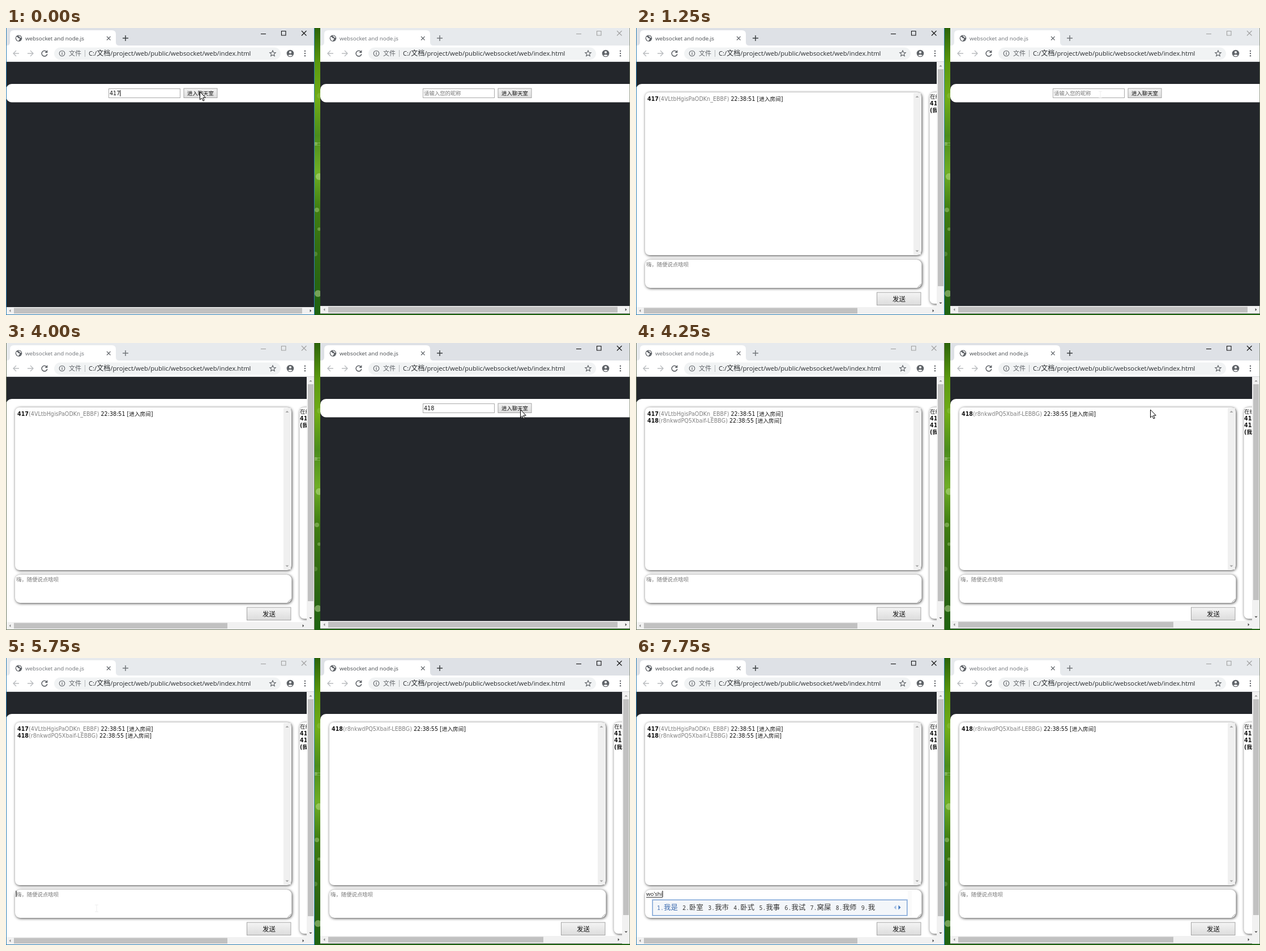
An HTML page that plays this animation: 1102 px wide and 508 px high, repeating every 8 s.

```html
<!DOCTYPE html>
<html lang="zh">
<head>
<meta charset="utf-8">
<title>websocket and node.js</title>
<style>
html, body { margin: 0; width: 100%; height: 100%; overflow: hidden; background: #23262b; }
svg { display: block; width: 1102px; height: 508px; }
text { white-space: pre; }
.ui { font-family: "Open Sans", "Noto Sans CJK SC", "Noto Sans CJK", sans-serif; }
.page { font: 9.6px "DejaVu Sans", "Noto Sans CJK SC", "Noto Sans CJK", sans-serif; fill: #111; }
.cand { font: 12.4px "Noto Sans CJK SC", "Noto Sans CJK", sans-serif; fill: #333; }
.num { font: 10px "Noto Sans Mono", monospace; }
.hint { fill: #777; font-size: 9.4px; }
.id { fill: #808080; }
.b { font-weight: bold; }
.win { --bar: #e7eaed; --ink: #a0a0a0; --title: #6c7075; --plus: #72767a; --edge: #6f7a62; }
.win.on { --bar: #dee1e6; --ink: #111; --title: #45494d; --plus: #3c4043; }
.win.edge { --edge: #2c7fb5; }
.line { fill: none; stroke-width: 1.1; }
.card { fill: #fff; filter: drop-shadow(1px 1px 2.5px rgba(0,0,0,.75)); }
</style>
</head>
<body>
<svg id="stage" viewBox="0 0 1102 508" xmlns="http://www.w3.org/2000/svg"></svg>
<script>
const LOOP = 8000, STEP = 250;
const users = [
  { name: '417', id: '4VLtbHgisPaODKn_EBBF', time: '22:38:51' },
  { name: '418', id: 'r8nkwdPQ5Xbaif-LEBBG', time: '22:38:55' }
];

const rect = (x, y, w, h, fill, more = '') =>
  `<rect x="${x}" y="${y}" width="${w}" height="${h}" fill="${fill}" ${more}/>`;
const text = (x, y, s, more = 'class="page"') => `<text x="${x}" y="${y}" ${more}>${s}</text>`;
const path = (d, stroke, more = '') => `<path class="line" d="${d}" stroke="${stroke}" ${more}/>`;
const dot = (x, y, r, fill, more = '') => `<circle cx="${x}" cy="${y}" r="${r}" fill="${fill}" ${more}/>`;

// small triangle pointing by angle: 0 right, 90 down
const tri = (x, y, angle, fill, s = 3) =>
  `<path d="M${-s / 2} ${-s}L${s / 2} 0L${-s / 2} ${s}Z" fill="${fill}" transform="translate(${x} ${y}) rotate(${angle})"/>`;

const entry = (u, y) => text(20, y,
  `<tspan class="b">${u.name}</tspan><tspan class="id">(${u.id})</tspan> ${u.time} [进入房间]`);

function button(x, y, w, h, label, tx, ty, size) {
  return rect(x + .5, y + .5, w - 1, h - 1, 'url(#btn)', 'stroke="#a3a3a3"') +
    text(tx, ty, label, `class="page" style="font-size:${size}px"`);
}

function tabBar(W) {
  const g = '#5f6368', light = '#b9bcbf';
  return rect(0, 0, W, 60, 'var(--bar)') +
    `<path d="M1 31Q7 31 7 25V11Q7 4 14 4H187Q194 4 194 11V25Q194 31 200 31Z" fill="#fff"/>` +
    rect(0, 31, W, 28, '#fff') + rect(0, 59, W, 1, '#d5d7da') +
    dot(22.5, 18.2, 5.8, g) +
    `<path d="M18 16q2-1 3 1t3 1q1 2-1 3l-1 2q-3-1-4-4zM23 13q1 2 3 2l1 2q-2 1-3-1t-2-1z" fill="#fff"/>` +
    text(34, 22, 'websocket and node.js', 'class="ui" font-size="9.8" fill="var(--title)"') +
    path('M178 15l6.5 6.5m0-6.5l-6.5 6.5', g, 'stroke-width="1.3"') +
    path('M206 18h10m-5-5v10', 'var(--plus)', 'style="stroke-width:1.5"') +
    path(`M${W - 95} 10.5h9`, 'var(--ink)') +
    path(`M${W - 58.5} 5.5h7.5v7.5h-7.5z`, 'var(--ink)') +
    path(`M${W - 23} 5l8.5 8.5m0-8.5l-8.5 8.5`, 'var(--ink)') +
    path('M23 45H13m5-5l-5 5l5 5', light, 'style="stroke-width:1.4"') +
    path('M38 45h10m-5-5l5 5l-5 5', light, 'style="stroke-width:1.4"') +
    path('M72 42.3A4.9 4.9 0 1 0 72.8 46', g, 'style="stroke-width:1.5"') +
    `<path d="M73.4 39v5h-5z" fill="${g}"/>` +
    rect(85, 34.5, W - 145, 21.5, '#f1f3f4', 'rx="10.75"') +
    dot(99, 45, 4.8, 'none', `stroke="${g}" stroke-width="1.1"`) +
    rect(98.4, 44.2, 1.3, 3.4, g) + rect(98.4, 42.2, 1.3, 1.2, g) +
    text(111, 49, '文件', `class="ui" font-size="11" fill="${g}"`) +
    rect(139, 39, 1, 12, '#b4b7ba') +
    text(146, 49, 'C:/<tspan font-size="12">文档</tspan>/project/web/public/websocket/web/index.html',
      'class="ui" font-size="11.26" fill="#26292c"') +
    path('M0-5.2L1.5-1.7L5.2-1.4L2.4 1L3.3 4.7L0 2.7L-3.3 4.7L-2.4 1L-5.2-1.4L-1.5-1.7Z', g, `transform="translate(${W - 74} 45)"`) +
    dot(W - 43, 45, 6.3, g) + dot(W - 43, 43, 2.1, '#fff') +
    `<path d="M${W - 47} 48.6q4-3.2 8 0q-4 3.2-8 0z" fill="#fff"/>` +
    [40.8, 45, 49.2].map(y => dot(W - 17, y, 1.2, g)).join('');
}

function hbar(W, B, end, last) {
  return rect(0, B, W, 13.5, '#f1f1f1') + rect(14, B + 1.5, end - 14, 10, '#c1c1c1') +
    tri(7, B + 6.5, 180, '#8a8a8a', 2.6) + tri(last, B + 6.5, 0, '#444', 2.6);
}

function login(k, W, B) {
  return `<g id="login${k}">` + rect(0, 99, W + 40, 32.5, '#fff', 'rx="10"') +
    rect(181.5, 107.5, 126, 16, '#fff', 'stroke="#a9a9a9"') +
    text(183, 119, '', `id="nick${k}" class="page"`) +
    rect(0, 110, 1, 11, '#000', `id="nickCaret${k}"`) +
    button(313.5, 106.5, 60, 17.5, '进入聊天室', 320, 119, 9.4) +
    hbar(W, B, W - 22, W - 7) + '</g>';
}

function chat(k, W, B) {
  const V = W - 14;
  return `<g id="chat${k}"><g clip-path="url(#view${k})">` +
    rect(0, 99, W + 40, 440, '#fff', 'rx="10"') +
    rect(16, 114, 488, 288, '#fff', 'rx="8" class="card"') +
    rect(490, 115, 13, 286, '#f0f0f0') +
    tri(496.5, 121.5, -90, '#a3a3a3', 3) + tri(496.5, 395, 90, '#a3a3a3', 3) +
    rect(16, 410, 488.5, 50, '#fff', 'rx="9" class="card"') +
    path('M497.5 459l6-6m-2.5 6l3-3', '#777', 'style="stroke-width:.8"') +
    text(18, 422, '嗨，随便说点啥呗', `id="hint${k}" class="page hint"`) +
    button(425, 467.5, 78.5, 23.5, '发送', 453, 484, 11.5) +
    rect(518.5, 114, 120, 374, '#fff', 'rx="8" class="card"') +
    text(519, 125, '在线用户') + `<g id="list${k}"></g><g id="log${k}"></g></g>` +
    rect(V, 60, 14, B - 46, '#f1f1f1') + rect(V + 2, 73, 10, B - 110, '#c1c1c1') +
    tri(V + 7, 67, -90, '#8a8a8a', 2.6) + tri(V + 7, B - 7, 90, '#444', 2.6) +
    hbar(V, B, k ? 394 : 391, V - 6) + '</g>';
}

function win(k, x, W, B) {
  return `<clipPath id="win${k}c"><rect width="${W}" height="${B + 14}"/></clipPath>
    <clipPath id="view${k}"><rect y="60" width="${W - 14}" height="${B - 60}"/></clipPath>
    <g transform="translate(${x} 0)"><g id="win${k}" class="win" clip-path="url(#win${k}c)">` +
    rect(0, 0, W, 508, '#23262b') + tabBar(W) + login(k, W, B) + chat(k, W, B) +
    (k ? rect(W - 1, 0, 1, 508, 'var(--edge)', 'opacity=".7"')
       : rect(0, 0, 1, 508, 'var(--edge)') + rect(W - 1, 0, 1, 508, 'var(--edge)') + rect(0, 507, W, 1, 'var(--edge)')) +
    '</g></g>';
}

function wallpaper() {
  const drops = [[553, 263, 6, .4], [549, 322, 4, .35], [551, 470, 6, .45], [547, 205, 3, .3],
    [554, 120, 5, .15], [546, 400, 4, .2], [553, 356, 3, .3]];
  return rect(540, 0, 562, 508, 'url(#leaf)') +
    drops.map(([x, y, r, o]) => dot(x, y, r, '#d6efb0', `opacity="${o}"`)).join('') +
    rect(545, 203, 10, 1, '#a6c98a', 'opacity=".6"') + rect(545, 207, 10, 1, '#a6c98a', 'opacity=".4"');
}

const ime = `<g id="ime">` + rect(480, 411, 7, 47, '#fafafa') +
  rect(28, 427, 452, 30, '#b5cdec') + rect(29.5, 428.5, 449, 27, '#f3f6fa', 'stroke="#7fa3d3"') +
  '<g id="cands"></g>' + tri(457.5, 441.5, 180, '#9dbbe3', 4) + tri(465.5, 441.5, 0, '#3f76bd', 4) + '</g>';

const stops = ['#2c6408', '#5c9a10', '#71ad18', '#4b8c1c', '#6fae26', '#417f12', '#356f12', '#2a6512', '#1f6412'];
const $ = id => document.getElementById(id);

$('stage').innerHTML = `<defs>
  <linearGradient id="btn" x2="0" y2="1"><stop stop-color="#f4f4f4"/><stop offset="1" stop-color="#dcdcdc"/></linearGradient>
  <linearGradient id="leaf" x2="0" y2="1">${stops.map((c, i) =>
    `<stop offset="${i / (stops.length - 1)}" stop-color="${c}"/>`).join('')}</linearGradient></defs>` +
  wallpaper() + win(0, 0, 545, 494) + win(1, 555, 547, 492) +
  text(18, 421, '', 'id="pinyin" class="ui" font-size="9.7" fill="#111"') +
  rect(18, 423, 29, 1, '#333', 'id="under"') + rect(18, 412, 1, 11, '#000', 'id="caret"') + ime +
  `<path id="arrow" d="M0 0V14L3.2 11L5.5 16L7.7 15L5.4 10.2H9.8Z" fill="#fff" stroke="#000"/>
   <path id="beam" d="M-3-6h6M0-6V6M-3 6h6" fill="none" stroke="#eee"/>`;

// pointer keys: time, x, y
const moves = [
  [0, 342.5, 113], [250, 342.5, 113], [500, 430, 62], [750, 590, 50], [1000, 748, 90], [1250, 820, 118],
  [3000, 820, 118], [3250, 872, 110], [3500, 966, 119], [3750, 930, 117], [4000, 908.5, 118],
  [4250, 908.5, 118], [4500, 800, 176], [4750, 545, 300], [5000, 280, 404], [5250, 160, 443], [8000, 160, 443]
];

function pointer(t) {
  const i = Math.max(1, moves.findIndex(m => m[0] > t));
  const [a, b] = [moves[i - 1], moves[i]];
  const p = (t - a[0]) / (b[0] - a[0]);
  return [a[1] + (b[1] - a[1]) * p, a[2] + (b[2] - a[2]) * p];
}

const within = (t, a, b) => t >= a && t < b;
const show = (id, on) => $(id).setAttribute('display', on ? 'inline' : 'none');

function nick(k, value, caret) {
  const el = $('nick' + k);
  el.textContent = value || '请输入您的昵称';
  el.setAttribute('class', value ? 'page' : 'page hint');
  $('nickCaret' + k).setAttribute('x', 183 + value.length * 6.1);
  show('nickCaret' + k, caret);
}

function room(k, open, present, logged) {
  show('login' + k, !open);
  show('chat' + k, open);
  $('list' + k).innerHTML = [...present.map(u => u.name), '(我)']
    .map((s, i) => text(519, 136.7 + i * 12, s, 'class="page b"')).join('');
  $('log' + k).innerHTML = logged.map((u, i) => entry(u, 128.6 + i * 12.4)).join('');
}

function draw(t) {
  const both = t >= 4250;
  const rightOn = within(t, 1750, 6000);
  $('win0').setAttribute('class', `win ${rightOn ? '' : 'on'} ${within(t, 1500, 5500) ? '' : 'edge'}`);
  $('win1').setAttribute('class', `win ${rightOn ? 'on' : ''}`);

  room(0, t >= 250, both ? users : users.slice(0, 1), both ? users : users.slice(0, 1));
  room(1, both, users, users.slice(1));
  nick(0, users[0].name, true);
  nick(1, users[1].name.slice(0, t < 2500 ? 0 : t < 3000 ? 2 : 3), within(t, 1500, 3750));

  const typing = t >= 7500, full = t >= 7750;
  const pinyin = full ? "wo'shi" : 'wo';
  const end = full ? 47 : 31.5;
  show('hint0', !typing);
  show('ime', typing);
  show('under', typing);
  show('pinyin', typing);
  show('caret', within(t, 5500, 6250) || t >= 7000);
  $('pinyin').textContent = pinyin;
  $('under').setAttribute('width', end - 18);
  $('caret').setAttribute('x', typing ? end - .5 : 17.5);
  const words = (full ? '我是 卧室 我市 卧式 我事 我试 窝屎 我师 我' : '我 窝 握 卧 沃 涡 蜗 喔 斡').split(' ');
  $('cands').innerHTML = words.map((w, i) => text(37 + i * 45.1, 446,
    `<tspan class="num">${i + 1}.</tspan>${w}`, `class="cand" ${i ? '' : 'style="fill:#3a69ad"'}`)).join('');

  const ghost = within(t, 1250, 3250) || within(t, 5250, 7500);
  const at = `translate(${pointer(t).join(' ')})`;
  $('arrow').setAttribute('transform', at);
  $('beam').setAttribute('transform', at);
  show('arrow', !ghost && t < 5250);
  show('beam', ghost);
}

let last = -1;
function tick(now) {
  const t = Math.floor((now % LOOP) / STEP) * STEP;
  if (t !== last) draw(last = t);
  requestAnimationFrame(tick);
}
draw(0);
requestAnimationFrame(tick);
</script>
</body>
</html>
```
